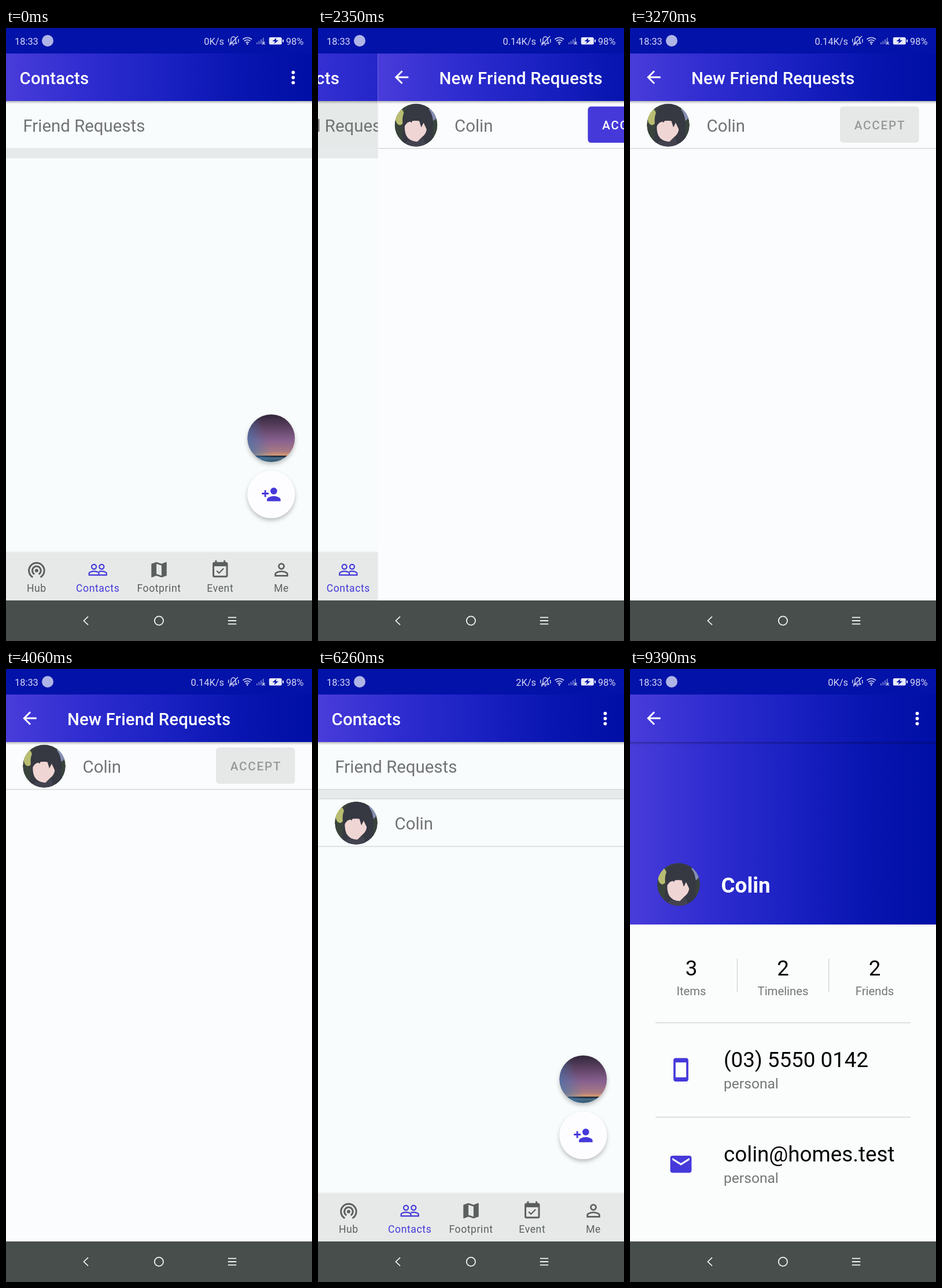
Animation of 529x1058 px, one loop 9470 ms. Source, as an HTML page:

```html
<!DOCTYPE html>
<html lang="en">
<head>
<meta charset="utf-8">
<title>Contacts</title>
<style>
  html, body { margin: 0; width: 100%; height: 100%; overflow: hidden; background: #474e4b; }
  svg { display: block; width: 100vw; height: 100vh; }
  text { font-family: Roboto, "Noto Sans", sans-serif; }
  .status { font-size: 16.4px; fill: #d4d8f4; }
  .title { font-size: 29.4px; font-weight: 500; letter-spacing: .2px; fill: #fff; }
  .row { font-size: 29.4px; fill: #717374; }
  .tab { font-size: 17.6px; letter-spacing: .58px; text-anchor: middle; }
  .btn { font-size: 20.6px; font-weight: 500; letter-spacing: 1.84px; text-anchor: middle; }
  .name { font-size: 36.8px; font-weight: 700; fill: #fff; }
  .big { font-size: 36.75px; fill: #050506; }
  .stat { font-size: 20.3px; fill: #747677; }
  .kind { font-size: 24.6px; fill: #747677; }
  .mid { text-anchor: middle; }
</style>
</head>
<body>
<svg id="stage" viewBox="0 0 529 1058" preserveAspectRatio="none"></svg>
<script>
const LOOP = 9470;
const W = 529;
const ACCENT = '#4639da';
const GREY = '#5b5f5e';
const NAME = 'Colin';

const text = (cls, x, y, s, extra = '') => `<text class="${cls}" x="${x}" y="${y}" ${extra}>${s}</text>`;
const rect = (x, y, w, h, fill, extra = '') =>
  `<rect x="${x}" y="${y}" width="${w}" height="${h}" fill="${fill}" ${extra}/>`;
const circle = (x, y, r, fill, extra = '') => `<circle cx="${x}" cy="${y}" r="${r}" fill="${fill}" ${extra}/>`;
const stroke = (d, color, width) => `<path d="${d}" fill="none" stroke="${color}" stroke-width="${width}"/>`;

// Icons live on a 24-unit grid and are centred on (x, y).
const icon = (name, x, y, color, scale = 1.47) =>
  `<g transform="translate(${x} ${y}) scale(${scale}) translate(-12 -12)" fill="${color}" stroke="none" color="${color}">${icons[name]}</g>`;
const line = (d, width) => stroke(d, 'currentColor', width);

const icons = {
  hub: circle(12, 13, 2, 'currentColor') +
    line('M9.5 17.3a5 5 0 1 1 5 0', 2) + line('M7.5 20.8a9 9 0 1 1 9 0', 2),
  people: circle(7.5, 8.5, 2.75, 'none', 'stroke="currentColor" stroke-width="1.5"') +
    circle(16.5, 8.5, 2.75, 'none', 'stroke="currentColor" stroke-width="1.5"') +
    line('M1.75 18.25v-2c0-1.3 3.2-2.5 5.75-2.5s5.75 1.2 5.75 2.5v2z', 1.5) +
    line('M13.2 14.3c1-.35 2.2-.55 3.3-.55 2.5 0 5.75 1.2 5.75 2.5v2h-9', 1.5),
  map: '<path d="M20.5 3l-.16.03L15 5.1 9 3 3.36 4.9c-.21.07-.36.25-.36.48V20.5c0 .28.22.5.5.5l.16-.03L9 18.9l6 2.1 5.64-1.9c.21-.07.36-.25.36-.48V3.5c0-.28-.22-.5-.5-.5zM15 19l-6-2.11V5l6 2.11z"/>',
  event: '<path d="M16.53 11.06L15.47 10l-4.88 4.88-2.12-2.12-1.06 1.06L10.59 17zM19 3h-1V1h-2v2H8V1H6v2H5c-1.1 0-2 .9-2 2v14c0 1.1.9 2 2 2h14c1.1 0 2-.9 2-2V5c0-1.1-.9-2-2-2zm0 16H5V8h14z"/>',
  person: circle(12, 8, 3.05, 'none', 'stroke="currentColor" stroke-width="1.9"') +
    line('M4.95 19.05V17c0-1.5 4-3.05 7.05-3.05s7.05 1.55 7.05 3.05v2.05z', 1.9),
  add: circle(15, 8, 4, 'currentColor') +
    '<path d="M6 10V7H4v3H1v2h3v3h2v-3h3v-2zM15 14c-2.67 0-8 1.34-8 4v2h16v-2c0-2.66-5.33-4-8-4z"/>',
  mail: '<path d="M20 4H4c-1.1 0-2 .9-2 2v12c0 1.1.9 2 2 2h16c1.1 0 2-.9 2-2V6c0-1.1-.9-2-2-2zm0 4l-8 5-8-5V6l8 5 8-5z"/>',
  phone: '<path d="M17 1H7c-1.1 0-2 .9-2 2v18c0 1.1.9 2 2 2h10c1.1 0 2-.9 2-2V3c0-1.1-.9-2-2-2zm0 18H7V5h10z"/>',
  back: '<path d="M20 11H7.83l5.59-5.59L12 4l-8 8 8 8 1.41-1.41L7.83 13H20z"/>'
};

const defs = `<defs>
  <linearGradient id="bar" gradientUnits="userSpaceOnUse" x1="0" y1="0" x2="529" y2="0">
    <stop offset="0" stop-color="#493cda"/><stop offset=".25" stop-color="#302dd0"/>
    <stop offset=".5" stop-color="#1c22c3"/><stop offset=".78" stop-color="#0815b0"/>
    <stop offset="1" stop-color="#000fa5"/>
  </linearGradient>
  <linearGradient id="fall" x1="0" y1="0" x2="0" y2="1">
    <stop offset="0" stop-color="#000" stop-opacity=".27"/><stop offset="1" stop-color="#000" stop-opacity="0"/>
  </linearGradient>
  <linearGradient id="dusk" x1="0" y1="0" x2="0" y2="1">
    <stop offset="0" stop-color="#30263a"/><stop offset=".25" stop-color="#5a3f5f"/>
    <stop offset=".55" stop-color="#87618f"/><stop offset=".78" stop-color="#a87a83"/>
    <stop offset=".86" stop-color="#d99a70"/><stop offset=".87" stop-color="#1f2a3a"/>
    <stop offset=".9" stop-color="#2c3d52"/><stop offset=".91" stop-color="#4f7389"/>
    <stop offset="1" stop-color="#2f506a"/>
  </linearGradient>
  <linearGradient id="sea" x1="0" y1=".75" x2="1" y2=".4">
    <stop offset="0" stop-color="#3f76ad" stop-opacity=".75"/><stop offset=".45" stop-color="#3f76ad" stop-opacity="0"/>
  </linearGradient>
  <filter id="soft" x="-30%" y="-30%" width="160%" height="160%">
    <feDropShadow dx="0" dy="4" stdDeviation="3.5" flood-opacity=".25"/>
  </filter>
  <clipPath id="round"><circle r="37"/></clipPath>
  <clipPath id="app"><rect y="44" width="529" height="944"/></clipPath>
</defs>`;

const avatar = (x, y) => `<g transform="translate(${x} ${y})" clip-path="url(#round)">
  ${circle(0, 0, 37, '#39433c')}
  <ellipse cx="-28" cy="-14" rx="8" ry="14" fill="#b9bd72"/>
  <ellipse cx="27" cy="-18" rx="9" ry="11" fill="#858eb2"/>
  <path d="M-22 4C-28-22-14-37 3-36 25-35 33-14 29 12L34 38H-26z" fill="#363842"/>
  <path d="M-19-2Q-4-12 17-4 22 12 10 21L2 29Q-12 28-17 18-21 8-19-2z" fill="#efd5d3"/>
  <path d="M-21 3Q-18-22 2-28 21-23 20 11L13-4 9 4 5-9-4-13-8-4-12-8z" fill="#363842"/>
  <path d="M-26 38L-14 27 2 29 12 22 18 38z" fill="#43434f"/>
</g>`;

const header = title => rect(0, 44, W, 82, 'url(#bar)') + rect(0, 126, W, 5, 'url(#fall)') + title;
const more = [76.7, 85.5, 94.3].map(y => circle(496.5, y, 2.9, '#fff')).join('');
const backArrow = icon('back', 41, 85, '#fff');
const rule = y => rect(0, y, W, 1.6, '#d8dcde');

const tabs = [['hub', 'Hub'], ['people', 'Contacts'], ['map', 'Footprint'], ['event', 'Event'], ['person', 'Me']]
  .map(([name, label], i) => {
    const x = 52.9 + i * 105.8, color = i === 1 ? ACCENT : GREY;
    return icon(name, x, 935, color) + text('tab', x, 973, label, `fill="${color}"`);
  }).join('');

const contacts = rect(0, 44, W, 944, '#f8fcfc') +
  rect(0, 126, W, 81, '#e5e9e7', 'id="press1"') +
  text('row', 29.5, 178.5, 'Friend Requests') +
  rect(0, 207, W, 18, '#e7eaea') +
  `<g id="friend">${rule(207)}${rule(223.2)}${rect(0, 225, W, 81, '#e5e9e7', 'id="press2"')}
    ${avatar(66, 265.7)}${text('row', 132.5, 276.7, NAME)}${rule(305.5)}</g>` +
  header(text('title', 23.5, 97, 'Contacts') + more) +
  circle(458.4, 708, 41, 'url(#dusk)', 'filter="url(#soft)"') + circle(458.4, 708, 41, 'url(#sea)') +
  circle(458.4, 805, 41, '#fdfdff', 'filter="url(#soft)"') + icon('add', 458.5, 805, ACCENT) +
  rect(0, 903, W, 2, '#eff2f1') + rect(0, 905, W, 83, '#e6e9e8') + tabs;

const requests = rect(0, 44, W, 944, '#fafcfd') +
  avatar(66, 167.5) + text('row', 132.5, 178.5, NAME) +
  rect(363, 135.5, 136.5, 62.5, ACCENT, 'rx="5.5" id="accept"') +
  text('btn', 432, 175, 'ACCEPT', 'id="acceptText"') + rule(207) +
  header(backArrow + text('title', 106, 97, 'New Friend Requests'));

const stats = [['3', 'Items'], ['2', 'Timelines'], ['2', 'Friends']]
  .map(([n, label], i) => {
    const x = 106 + i * 158.5;
    return text('big mid', x, 528.5, n) + text('stat mid', x, 563, label);
  }).join('');
const entry = (name, y, value) =>
  rect(44, y, 441, 1.5, '#d2d4d6') + icon(name, 88, y + 82, ACCENT, 1.84) +
  text('big', 162, y + 77.5, value) + text('kind', 162, y + 114, 'personal');

const profile = rect(0, 44, W, 944, '#fbfcfc') + rect(0, 44, W, 397, 'url(#bar)') +
  rect(0, 126, W, 5, 'url(#fall)') + backArrow + more +
  avatar(84, 371.7) + text('name', 157.5, 386, NAME) + stats +
  rect(184.8, 500, 1.4, 58, '#d2d4d6') + rect(343, 500, 1.4, 58, '#d2d4d6') +
  entry('phone', 609.8, '(03) 5550 0142') + entry('mail', 772.8, 'colin@homes.test');

const PALE = '#d4d8f4';
const bars = [0, 1, 2, 3].map(i => rect(433 + i * 3.6, 25 - i * 2.7, 1.7, 3 + i * 2.7, '#7d87d8')).join('');
const status = rect(0, 0, W, 44, '#0312a8') +
  text('status', 15, 28.5, '18:33') + circle(72, 22, 10, '#aeb5e6') +
  text('status', 377, 28.5, '0K/s', 'id="speed" text-anchor="end"') +
  stroke('M387 26.5h12l-2-2.5v-4c0-3-1.800-5-4-5s-4 2-4 5v4zM391.500 29h3M401 14l-15 16M384.800 18.500v6M401.800 19v6', PALE, 1.4) +
  stroke('M409.500 19.500q7.700-6 15.400 0M412 22.500q5.200-4 10.400 0M414.500 25.400q2.700-2 5.400 0', PALE, 1.6) +
  circle(417.2, 27.6, 1.3, PALE) + bars + stroke('M443 24l4.500 4.500m0-4.500l-4.500 4.500', PALE, 1.3) +
  rect(454.8, 16, 22, 12.5, '#e8eafb', 'rx="2.5"') + rect(478, 20, 2, 4.5, '#e8eafb') +
  '<path d="M467.500 17l-7 6h4.500l-1.500 4.500 7.500-6.200h-4.500z" fill="#0312a8"/>' +
  text('status', 484, 28.5, '98%');

const system = rect(0, 988, W, 70, '#474e4b') +
  stroke('M142 1015.800l-7.500 7.200 7.500 7.200', '#f4f5f4', 1.7) +
  circle(264.4, 1023, 7.6, 'none', 'stroke="#f4f5f4" stroke-width="1.8"') +
  stroke('M383.800 1017.300h14.400M383.800 1023h14.400M383.800 1028.700h14.400', '#f4f5f4', 1.8);

const stage = document.getElementById('stage');
stage.innerHTML = defs + `<g clip-path="url(#app)">
  <g id="contacts">${contacts}</g><g id="requests">${requests}</g><g id="profile">${profile}</g></g>` +
  status + system;

const el = {};
stage.querySelectorAll('g[id], rect[id], text[id]').forEach(n => el[n.id] = n);

const ramp = (t, a, b) => Math.min(1, Math.max(0, (t - a) / (b - a)));
const easeOut = p => 1 - (1 - p) ** 3;
const slide = (t, a, b) => easeOut(ramp(t, a, b));
const show = (node, on) => node.setAttribute('visibility', on ? 'visible' : 'hidden');
const moveX = (node, x) => node.setAttribute('transform', `translate(${x.toFixed(2)} 0)`);

function draw(t) {
  const req = slide(t, 2200, 2560) - slide(t, 4580, 4780);
  const prof = slide(t, 8140, 8320);
  moveX(el.contacts, -W / 4 * Math.max(req, prof));
  moveX(el.requests, W * (1 - req));
  moveX(el.profile, W * (1 - prof));
  show(el.requests, req > 0);
  show(el.profile, prof > 0);
  show(el.friend, t >= 4000);

  el.press1.setAttribute('opacity', t >= 2020 && t < 4000 ? 1 : 0);
  el.press2.setAttribute('opacity', t >= 7770 ? 1 - ramp(t, 7940, 8100) : 0);

  const done = t >= 3200;
  el.accept.setAttribute('fill', done ? '#e5e8e7' : t >= 3000 ? '#6358e0' : ACCENT);
  el.acceptText.setAttribute('fill', done ? '#969a99' : '#fff');

  const speed = t < 2300 ? '0K/s' : t < 5720 ? '0.14K/s' : t < 9260 ? '2K/s' : '0K/s';
  if (el.speed.textContent !== speed) el.speed.textContent = speed;
}

const start = performance.now();
function tick() {
  draw((performance.now() - start) % LOOP);
  requestAnimationFrame(tick);
}
tick();
</script>
</body>
</html>
```
